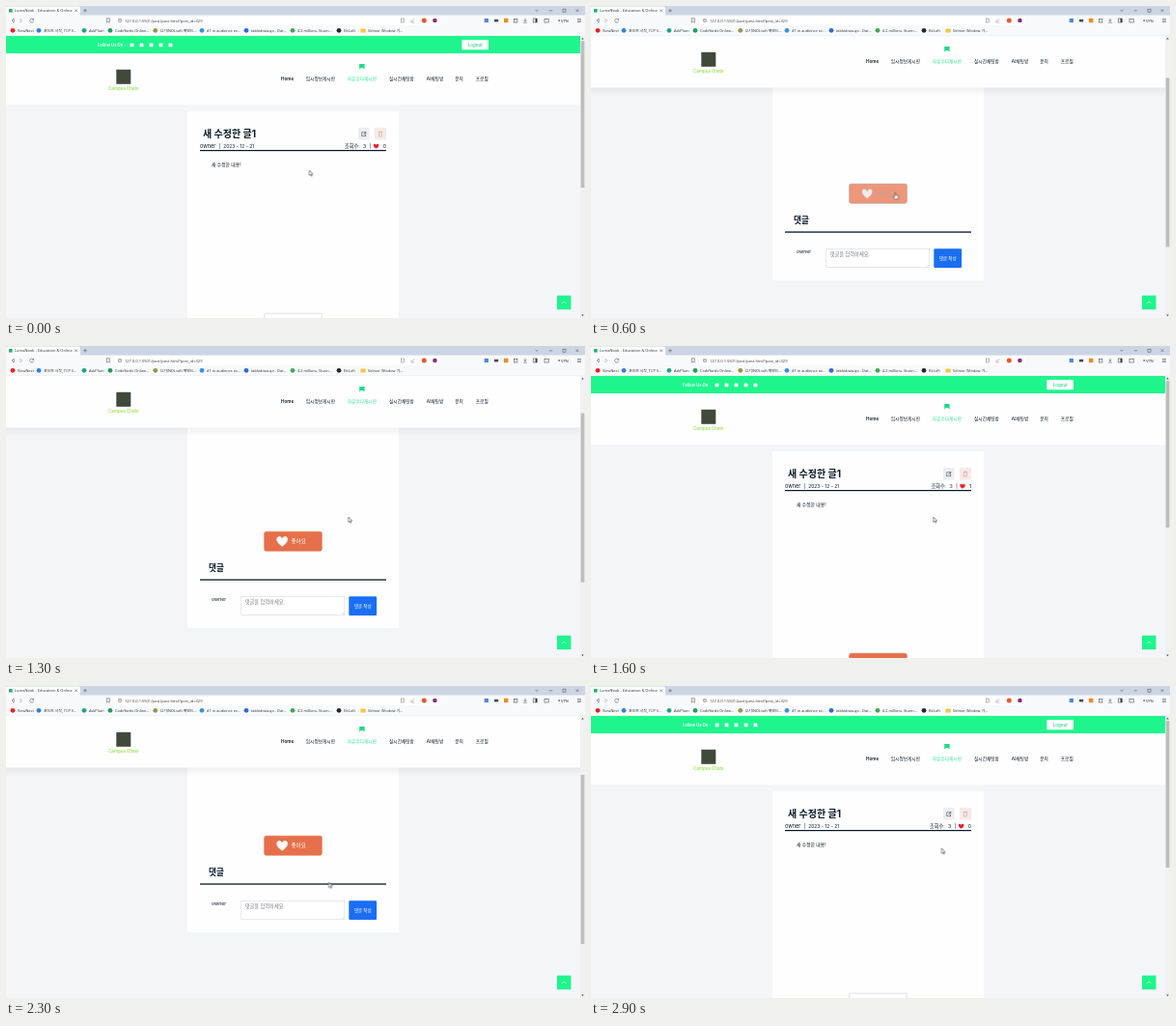
Animation of 600x323 px, one loop 3 s. Source, as an HTML page:

```html
<!DOCTYPE html>
<html lang="ko">
<head>
<meta charset="utf-8">
<title>Post page</title>
<style>
html, body { margin: 0; width: 100%; height: 100%; overflow: hidden; background: #f3f5f9; }
svg { display: block; width: 100vw; height: 100vh; }
text { font-family: Inter, "Noto Sans CJK KR", "Noto Sans CJK", sans-serif; white-space: pre; }
.ui text { font-family: "Open Sans", "Noto Sans CJK KR", "Noto Sans CJK", sans-serif; }
</style>
</head>
<body>
<svg id="stage" viewBox="0 0 600 323" preserveAspectRatio="none"></svg>
<script>
const NS = 'http://www.w3.org/2000/svg';
const GREEN = '#1ff58d', NAVY = '#081828', ORANGE = '#e5704a', LOOP = 3000;

function add(parent, tag, attrs = {}) {
  const el = document.createElementNS(NS, tag);
  for (const k in attrs) el.setAttribute(k, attrs[k]);
  return parent.appendChild(el);
}
const group = (p, attrs) => add(p, 'g', attrs);
const rect = (p, x, y, width, height, fill, more) => add(p, 'rect', { x, y, width, height, fill, ...more });
const dot = (p, cx, cy, r, fill) => add(p, 'circle', { cx, cy, r, fill });
const shape = (p, d, fill, more) => add(p, 'path', { d, fill, ...more });
const line = (p, d, stroke, width = 0.5) => shape(p, d, 'none', { stroke, 'stroke-width': width });
const box = (p, x, y, w, h, stroke) => rect(p, x, y, w, h, 'none', { stroke, 'stroke-width': 0.5 });
function text(p, x, y, str, size, fill = NAVY, weight = 400, anchor = 'start') {
  const el = add(p, 'text', { x, y, fill, 'font-size': size, 'font-weight': weight, 'text-anchor': anchor });
  el.textContent = str;
  return el;
}
function heart(p, x, y, w, fill, more) {
  return shape(p, 'M0 .45C-.7 0-.5-.42-.25-.42Q-.08-.42 0-.22Q.08-.42.25-.42C.5-.42.7 0 0 .45Z',
    fill, { transform: `translate(${x} ${y}) scale(${w})`, ...more });
}

const stage = document.getElementById('stage');
rect(stage, 0, 0, 600, 323, '#f3f5f9');

// Post card
const page = group(stage);
rect(page, 188, 109, 219, 309, '#fefefe');
text(page, 204, 135.8, '새 수정한 글1', 10, NAVY, 700);
rect(page, 365, 126, 11.5, 12.5, '#eceef0', { rx: 0.8 });
box(page, 368.8, 130.8, 4, 4, '#333b45');
line(page, 'M370.3 133.2l2.8-2.8', '#333b45', 0.7);
rect(page, 382, 126, 12, 12.5, '#f6eae8', { rx: 0.8 });
box(page, 386.7, 130.8, 2.6, 4.2, '#dc8e83');
line(page, 'M386 130.3h4', '#dc8e83');
text(page, 201, 147, 'owner', 5.5);
text(page, 220.4, 147, '|', 5);
text(page, 225.3, 147, '2023 - 12 - 21', 4.9);
rect(page, 201, 149, 193, 1.2, NAVY);
text(page, 213, 165.7, '새 수정한 내용!', 4.8);

const views = group(page);
text(views, 351, 147, '조회수:', 5.2);
text(views, 370, 147, '3', 5.2);
text(views, 376.4, 147, '|', 5);
heart(views, 383.6, 145.2, 5.8, '#ec1c2d');
const counts = ['0', '1'].map(n => text(page, 394, 147, n, 5.2, NAVY, 400, 'end'));

// Like button: idle, changing, liked
const likes = [
  ['#fefefe', '#c9cbce', '#b4b8bc', '#6c757d'],
  ['#ee9679', '#a98f86', '#efebea', '#b9a59d'],
  [ORANGE, ORANGE, '#fff', '#fff']
].map(([fill, stroke, mark, ink]) => {
  const g = group(page);
  rect(g, 267.7, 318.2, 59.6, 20, fill, { rx: 2, stroke, 'stroke-width': 0.6 });
  heart(g, 286.2, 328.2, 11.5, mark, { stroke: ink, 'stroke-width': 0.04 });
  text(g, 295.4, 330.2, '좋아요', 5.6, ink);
  return g;
});

// Comment form
text(page, 210, 358.5, '댓글', 8.6, NAVY, 700);
rect(page, 201, 367.4, 193, 1.3, NAVY);
text(page, 213, 390.2, 'owner', 5.2);
rect(page, 243.8, 385.3, 107, 19.2, '#fff', { stroke: '#cfd2d6', 'stroke-width': 0.5 });
text(page, 247.8, 393, '댓글을 입력하세요.', 5.2, '#75797e');
line(page, 'M348.4 404l2-2', '#888', 0.3);
rect(page, 355.3, 385.2, 28.8, 19.8, '#1a6ef4', { rx: 1.2 });
text(page, 369.7, 396.8, '댓글 작성', 4.6, '#fff', 500, 'middle');

// Green strip
const strip = group(stage);
rect(strip, 0, 31, 595, 18.2, GREEN);
text(strip, 95, 41.9, 'Follow Us On :', 4.2, '#fff', 600);
for (let i = 0; i < 5; i++) rect(strip, 128.6 + i * 10, 38.5, 3.8, 3.8, '#fff', { rx: 0.4 });
rect(strip, 472.3, 35, 27.7, 10.2, '#fff', { rx: 0.8 });
text(strip, 486.2, 41.8, 'Logout', 4.5, '#20cf7e', 500, 'middle');

// Navigation header
const header = group(stage);
const shade = group(header);
for (let i = 0; i < 6; i++) rect(shade, 0, 102, 595, 1.5 + i * 1.6, '#5a6478', { opacity: 0.012 });
rect(header, 0, 49, 595, 53.5, '#fefefe');
rect(header, 114.3, 65.8, 15, 15, '#3f4a3b');
text(header, 121.8, 86.8, 'Campus Chats', 4.5, '#86e33c', 500, 'middle');
const menu = { Home: 285, 입시정보게시판: 310.8, 자유수다게시판: 353.8, 실시간채팅방: 397, AI채팅방: 435.8, 문의: 465.3, 프로필: 486.8 };
Object.entries(menu).forEach(([label, x], i) =>
  text(header, x, 77.2, label, 4.7, i === 2 ? '#25e58c' : NAVY, i ? 400 : 600));
shape(header, 'M366.2 60h5.4v5.4l-1.6-1.5h-2.2l-1.6 1.5z', '#1bdc83');

// Back to top
rect(stage, 571, 299.7, 14.5, 14.5, GREEN);
line(stage, 'M576.4 307.8l1.9-1.9 1.9 1.9', '#fff', 0.7);

// Scrollbar
rect(stage, 595, 31, 5, 292, '#f1f1f1');
shape(stage, 'M596.2 34.4l1.3-1.7 1.3 1.7zM596.2 319.6l1.3 1.7 1.3-1.7z', '#555');
const thumb = rect(stage, 595.7, 36, 3.7, 152, '#bdbdbd');

// Browser frame
const ui = group(stage, { class: 'ui' }), INK = '#444';
rect(ui, 0, 0, 600, 10, '#cbd5e4');
rect(ui, 0, 0.5, 77, 10, '#fbfcfd', { rx: 1.5 });
rect(ui, 0, 9.5, 600, 21.5, '#f8f9fb');
rect(ui, 112, 10.7, 338, 8.8, '#fff', { rx: 1.5 });
rect(ui, 0, 30.6, 600, 0.4, '#e3e6ea');
rect(ui, 3, 3, 3.6, 3.6, '#25b66c');
text(ui, 9, 6.4, 'LumaNook - Education & Online', 4, '#333');
const cross = x => line(ui, `M${x} 3.4l2.6 2.6m0-2.6l-2.6 2.6`, INK);
cross(71.3);
cross(590.7);
line(ui, 'M82 3v3.6M80.2 4.8h3.6M548.5 3.8l1.5 1.6 1.5-1.6M562.8 4.8h3.4', INK);
box(ui, 577, 3.2, 3, 3, INK);
line(ui, 'M8.2 13l-2.2 2 2.2 2z', INK);
line(ui, 'M14.8 13l2.2 2-2.2 2z', '#aaa');
line(ui, 'M28.4 14a2 2 0 1 0 .2 1.7M28.6 12.8v1.5h-1.5', INK);
line(ui, 'M104.3 12.8h3v4.4l-1.5-1.2-1.5 1.2z', INK);
dot(ui, 118, 15, 2, '#777');
dot(ui, 118, 15, 1.5, '#fff');
line(ui, 'M118 14v2', '#555');
text(ui, 123, 16.6, '127.0.0.1:5501/post/post.html?post_id=329', 4, '#333');
box(ui, 409.7, 13, 3, 4, '#777');
line(ui, 'M420 14.5v2.5h3.2M421 15.5l2.4-2', '#777');
dot(ui, 433.3, 15, 2.5, '#f0562b');
dot(ui, 444.4, 15, 2.3, '#8d2c83');
rect(ui, 495.7, 12.9, 4.2, 4.2, '#4c87e0');
rect(ui, 506, 13.8, 4.2, 2.6, '#454a52');
rect(ui, 516, 12.8, 4.4, 4.4, '#f08a24');
box(ui, 526.5, 13.6, 3.4, 3.4, '#333');
line(ui, 'M538 12.8v3M536.7 14.6l1.3 1.3 1.3-1.3M536.2 17.2h3.6', '#333');
box(ui, 546.2, 13, 4, 4, '#333');
rect(ui, 548.6, 13, 1.6, 4, '#333');
box(ui, 558, 13.5, 4.2, 3.5, '#333');
dot(ui, 573.2, 15, 1, '#777');
text(ui, 575, 16.5, 'VPN', 4, '#333');
for (let i = 0; i < 3; i++) rect(ui, 592, 13.2 + i * 1.6, 4, 0.5, '#333');
[[7, '#f02020', 'ViewNest'], [34, '#2f80e0', '포인트 시작, TCP S...'],
 [81, '#20a486', 'AskPlum'], [108, '#1f9d5b', 'CodeYards Online...'],
 [154.8, '#9a9348', '(2기)NOLsoft 백엔드...'], [203, '#3494e6', '#1 in audience ev...'],
 [249, '#2c6bd8', 'tabledraw.qo - Dat...'], [297, '#43a852', '4.2 million+ Stunn...'],
 [345, '#24292f', 'KitLoft'], [370, '', 'Velmor Window 가...']].forEach(([x, color, label]) => {
  if (color) dot(ui, x, 25.3, 2.4, color);
  else rect(ui, x - 2.6, 23.5, 5.4, 4.1, '#f3c64b', { rx: 0.5 });
  text(ui, x + 5, 26.9, label, 3.9, '#333');
});

// Pointers, tip at the origin
const edge = { stroke: '#222', 'stroke-width': 0.5 };
const arrow = shape(stage, 'M0 0V5.4L1.3 4.3 2.2 6.2 3 5.8 2.2 4H3.8Z', '#fff', edge);
const hand = shape(stage, 'M-.6 0Q0-.7.6 0V2.3L3.2 3.2 2.6 6.6H-.6L-2.3 3.9-.6 3.8Z', '#fff', edge);

// Tracks: [ms, value...]
const scrollTrack = [[0, 0], [300, 63], [800, 63], [1000, 0], [1100, 0], [1300, 55],
  [1400, 60], [1600, 0], [2000, 92], [2600, 92], [2900, 0]];
const pointerTrack = [[0, 314.3, 170], [300, 314.3, 170], [500, 315.4, 193.5], [700, 315.4, 193.5],
  [900, 354.8, 177], [1800, 354.8, 177], [2300, 334.5, 203.2], [2400, 316, 163],
  [2500, 316, 163], [2800, 363.3, 168]];

function sample(track, t) {
  const i = track.findIndex(k => k[0] > t);
  if (i < 0) return track[track.length - 1].slice(1);
  const a = track[i - 1], b = track[i], u = (t - a[0]) / (b[0] - a[0]);
  const ease = u * u * (3 - 2 * u);
  return a.slice(1).map((v, j) => v + (b[j + 1] - v) * ease);
}

// The screen refreshes ten times a second.
const steps = Array.from({ length: LOOP / 100 }, (_, n) => {
  const t = n * 100;
  const scroll = Math.round(sample(scrollTrack, t)[0]);
  const [x, y] = sample(pointerTrack, t);
  const like = t === 600 || t === 2500 ? 1 : t > 600 && t < 2500 ? 2 : 0;
  const grab = (t >= 500 && t <= 700) || t === 2400 || t === 2500;
  return { t, scroll, x, y, like, grab, stuck: scroll > 18 };
});

function play(el, style) {
  const frames = steps.map(s => ({ offset: s.t / LOOP, easing: 'step-end', ...style(s) }));
  frames.push({ ...frames[frames.length - 1], offset: 1 });
  el.animate(frames, { duration: LOOP, iterations: Infinity });
}
const move = (x, y) => ({ transform: `translate(${x}px, ${y}px)` });
const show = on => ({ opacity: on ? 1 : 0 });

// The header leaves the flow once stuck, so the page rises by its height.
play(page, s => move(0, -s.scroll - (s.stuck ? 71 : 0)));
play(strip, s => move(0, -s.scroll));
play(header, s => move(0, s.stuck ? -18 : -s.scroll));
play(shade, s => show(s.stuck));
play(thumb, s => ({
  y: 36 + s.scroll * (s.stuck ? 0.61 : 0.52) + 'px',
  height: (s.stuck ? 175 : 152) + 'px'
}));
play(views, s => move(s.like === 2 ? 1.4 : 0, 0));
counts.forEach((el, i) => play(el, s => show((s.like === 2) === (i === 1))));
likes.forEach((el, i) => play(el, s => show(s.like === i)));
play(arrow, s => ({ ...move(s.x, s.y), ...show(!s.grab) }));
play(hand, s => ({ ...move(s.x, s.y), ...show(s.grab) }));
</script>
</body>
</html>
```
